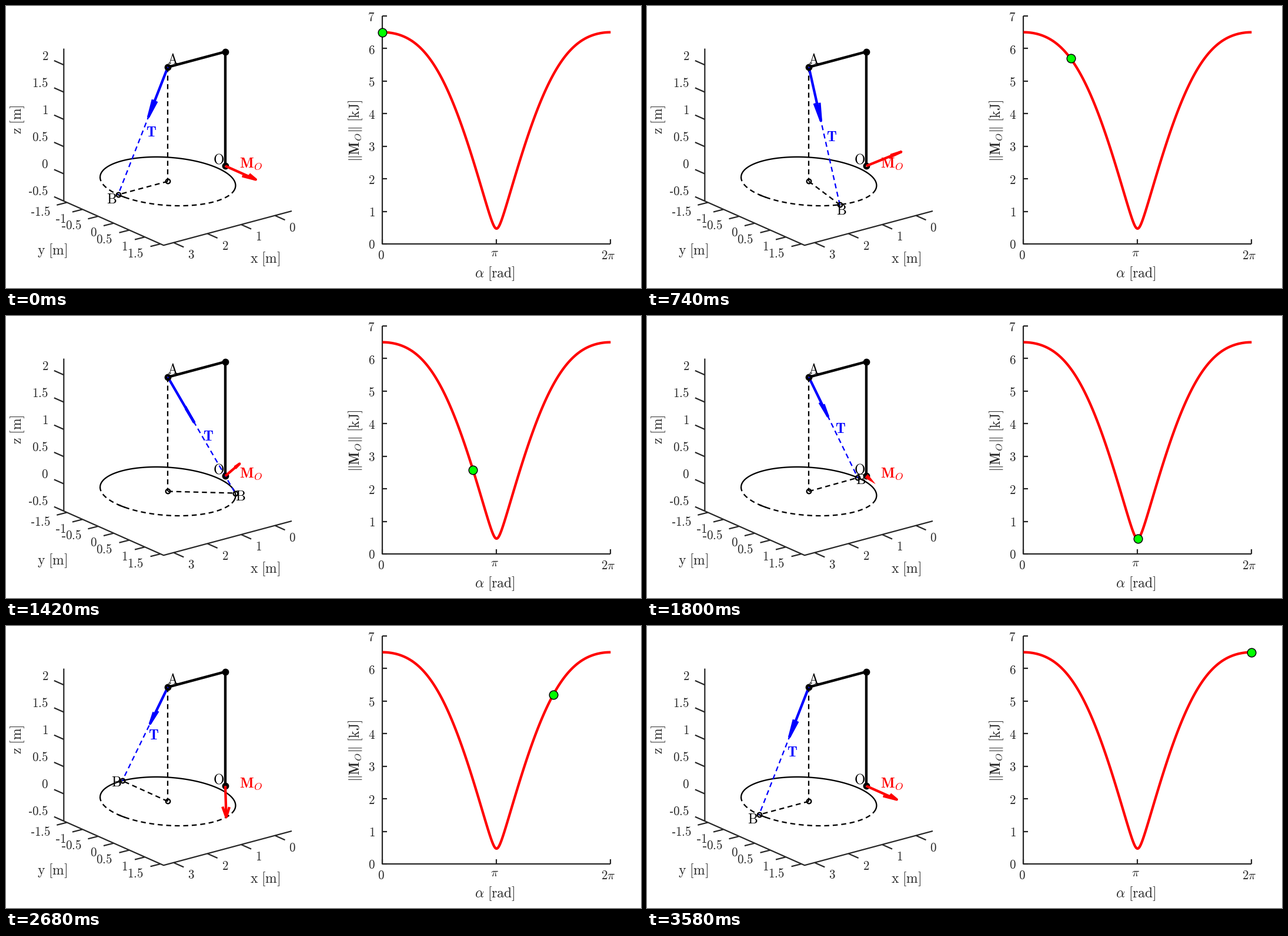
A matplotlib script that plays this animation: 1080x480 px, repeating every 3.6 s.

```python
import numpy as np
import matplotlib.pyplot as plt
from matplotlib.animation import FuncAnimation

W, H, DPI = 1080, 480, 100
FRAMES, INTERVAL = 180, 20
PX = 72 / DPI
GRAY, BLUE, RED = "#262626", "#0000ff", "#ff0000"
SMALL, LARGE = 21, 23.7

plt.rcParams.update({"mathtext.fontset": "cm", "lines.scale_dashes": False,
                     "path.simplify": False})
fig = plt.figure(figsize=(W / DPI, H / DPI), dpi=DPI, facecolor="white")
ax = fig.add_axes([0, 0, 1, 1])
ax.set_xlim(0, W)
ax.set_ylim(H, 0)
ax.axis("off")

# Crane geometry in metres, tension in kN
DIST, HEIGHT, TENSION = 1.7, 2.1, 2.5
RADIUS = HEIGHT * np.tan(np.radians(35))
LENGTH = np.hypot(RADIUS, HEIGHT)
ORIGIN = np.array([373, 272.3])
BASIS = np.array([[-57.5, 15.4], [53.2, 23.7], [0, -92.6]])


def project(p):
    return ORIGIN + np.asarray(p, float) @ BASIS


def line(pts, color, width, z=2, dashed=False, **kw):
    pts = np.asarray(pts, float)
    style = (0, (8.5 * PX, 6 * PX)) if dashed else "-"
    return ax.plot(pts[:, 0], pts[:, 1], color=color, lw=width * PX, ls=style,
                   dash_capstyle="butt", solid_capstyle="butt",
                   solid_joinstyle="round", zorder=z, **kw)[0]


def ring(p, size, width, z, fill="none"):
    return ax.plot([p[0]], [p[1]], "o", ms=size * PX, mfc=fill, mec="black",
                   mew=width * PX, zorder=z)[0]


def label(x, y, tex, size, color=GRAY, ha="center", rot=0):
    return ax.text(x, y, f"${tex}$", fontsize=size * PX, color=color, ha=ha,
                   va="baseline", rotation=rot, rotation_mode="anchor", zorder=3)


def number(x, y, text):
    """Right-aligned tick label with a short hyphen as its sign."""
    digits = text.lstrip("-")
    label(x, y, digits, SMALL, ha="right")
    if text != digits:
        left = x - SMALL * (1.278 if "." in digits else 0.5)
        line([(left - 6.6, y - 4.7), (left - 1, y - 4.7)], GRAY, 1.6)


def tick(x, y, dx, dy):
    line([(x, y), (x + dx, y + dy)], GRAY, 2.2)


def circle(start, stop):
    a = np.radians(np.linspace(start, stop, 200))
    ring3 = np.c_[DIST + RADIUS * np.cos(a), RADIUS * np.sin(a), 0 * a]
    return project(ring3)


def moment(a):
    s, c = np.sin(a), np.cos(a)
    m = np.array([-HEIGHT * RADIUS * s, HEIGHT * (RADIUS * c + DIST),
                  DIST * RADIUS * s])
    return m * TENSION / LENGTH


def plot_xy(a):
    norm = np.linalg.norm(moment(a), axis=0)
    return 640.3 + 388 * a / (2 * np.pi), 405 - 55.5 * norm


def draw_space_axes():
    line([(98.3, 72.5), (98.3, 332), (268, 407.3), (486, 349)], GRAY, 2.2)
    for i in range(6):
        tick(98.3, 332 - 46.35 * i, -16.5, -7.3)
        number(72, 322 - 46.1 * i, f"{i / 2 - 0.5:g}")
    for i in range(7):
        tick(103.3 + 26.55 * i, 334.5 + 11.75 * i, -17, 4.3)
        number(76 + 26.2 * i, 357 + 11.75 * i, f"{i / 2 - 1.5:g}")
    for i in range(4):
        tick(457.5 - 57.4 * i, 356.7 + 15.4 * i, 17, 7.5)
        label(487 - 57.4 * i, 384 + 15.3 * i, str(i), SMALL)
    label(26, 193.5, r"\mathrm{z\ [m]}", LARGE, rot=90)
    label(78.5, 423, r"\mathrm{y\ [m]}", LARGE)
    label(441, 437, r"\mathrm{x\ [m]}", LARGE)


def draw_plot():
    line([(640.3, 16.5), (640.3, 405), (1028.3, 405)], GRAY, 2.2)
    for i in range(8):
        tick(640.3, 405 - 55.5 * i, 8, 0)
        number(627.5, 413.3 - 55.3 * i, str(i))
    for i, (x, y, tex) in enumerate([(638, 431, "0"), (831, 426, r"\pi"),
                                     (1024, 430.5, r"2\pi")]):
        tick(640.3 + 194 * i, 405, 0, -8)
        label(x, y, tex, SMALL)
    label(831, 462, r"\alpha\ \mathrm{[rad]}", LARGE)
    label(601, 212, r"\Vert\mathbf{M}_O\Vert\ \mathrm{[kJ]}", LARGE, rot=90)
    line(np.c_[plot_xy(np.linspace(0, 2 * np.pi, 400))], RED, 4.3)


A3 = np.array([DIST, 0, HEIGHT])
O, A, C, TOP = (project(p) for p in
                [(0, 0, 0), A3, (DIST, 0, 0), (0, 0, HEIGHT)])


def draw_crane():
    line([O, TOP, A], "black", 4.4, z=4)
    line(circle(118, 315), "black", 2.3)
    line(circle(-45, 118), "black", 2.3, dashed=True)
    line(circle(0, 8), "black", 2.3)
    line([A, C], "black", 2.3, dashed=True)
    ring(C, 7.6, 2.3, 5)
    for p in (O, A, TOP):
        ring(p, 7.4, 4.4, 7)
    label(283, 97.5, r"\mathrm{A}", LARGE, "black")
    label(362, 268.5, r"\mathrm{O}", LARGE, "black")
    label(397, 274.5, r"\mathbf{M}_O", 25, RED, ha="left")


class Arrow:
    """Shaft and two barbs; the barbs spread in the horizontal plane."""

    def __init__(self, color, z):
        self.shaft = line([(0, 0), (0, 0)], color, 4.3, z)
        self.head = line([(0, 0), (0, 0)], color, 4.3, z)

    def place(self, base, vec):
        tip = base + vec
        side = 0.33 * 0.33 * np.array([-vec[1], vec[0], 0])
        neck = tip - 0.33 * vec
        self.shaft.set_data(*project([base, tip]).T)
        self.head.set_data(*project([neck + side, tip, neck - side]).T)


draw_space_axes()
draw_plot()
draw_crane()
pull = Arrow(BLUE, 6)
turn = Arrow(RED, 8)
wedge = ax.fill([0, 0, 0], [0, 0, 0], color=RED, lw=0, zorder=8)[0]
cable = line([A, A], BLUE, 2.3, 5, dashed=True)
spoke = line([C, C], "black", 2.3, dashed=True)
foot = ring(C, 7.6, 2.3, 5)
dot = ring(plot_xy(0.0), 14.6, 1.5, 9, "#00ff00")
foot_text = label(0, 0, r"\mathrm{B}", LARGE, "black")
pull_text = label(0, 0, r"\mathbf{T}", 24.5, BLUE)


def update(i):
    a = 2 * np.pi * i / (FRAMES - 1)
    b3 = np.array([DIST + RADIUS * np.cos(a), RADIUS * np.sin(a), 0])
    b = project(b3)
    t = (b3 - A3) / LENGTH
    m = 0.15 * moment(a)

    cable.set_data(*np.array([A, b]).T)
    spoke.set_data(*np.array([C, b]).T)
    foot.set_data([b[0]], [b[1]])
    pull.place(A3, t)
    turn.place(np.zeros(3), m)

    # A very short moment shows as a pointed wedge
    d = project(m) - O
    size = np.hypot(*d)
    wedge.set_visible(size < 6)
    d = d / size
    n = np.array([-d[1], d[0]])
    wedge.set_xy([O + 4 * n, O + 21 * d + 2 * n, O - 4 * n])

    foot_text.set_position(C + 1.1 * (b - C) + (-2.5, 12.6))
    pull_text.set_position(A + 1.25 * (t @ BASIS) + (13.3, 11.7))
    x, y = plot_xy(a)
    dot.set_data([x], [y])
    return cable, spoke, foot, dot, foot_text, pull_text


anim = FuncAnimation(fig, update, frames=FRAMES, interval=INTERVAL,
                     init_func=lambda: update(0), repeat=True, repeat_delay=0,
                     blit=False)
plt.show()
```
